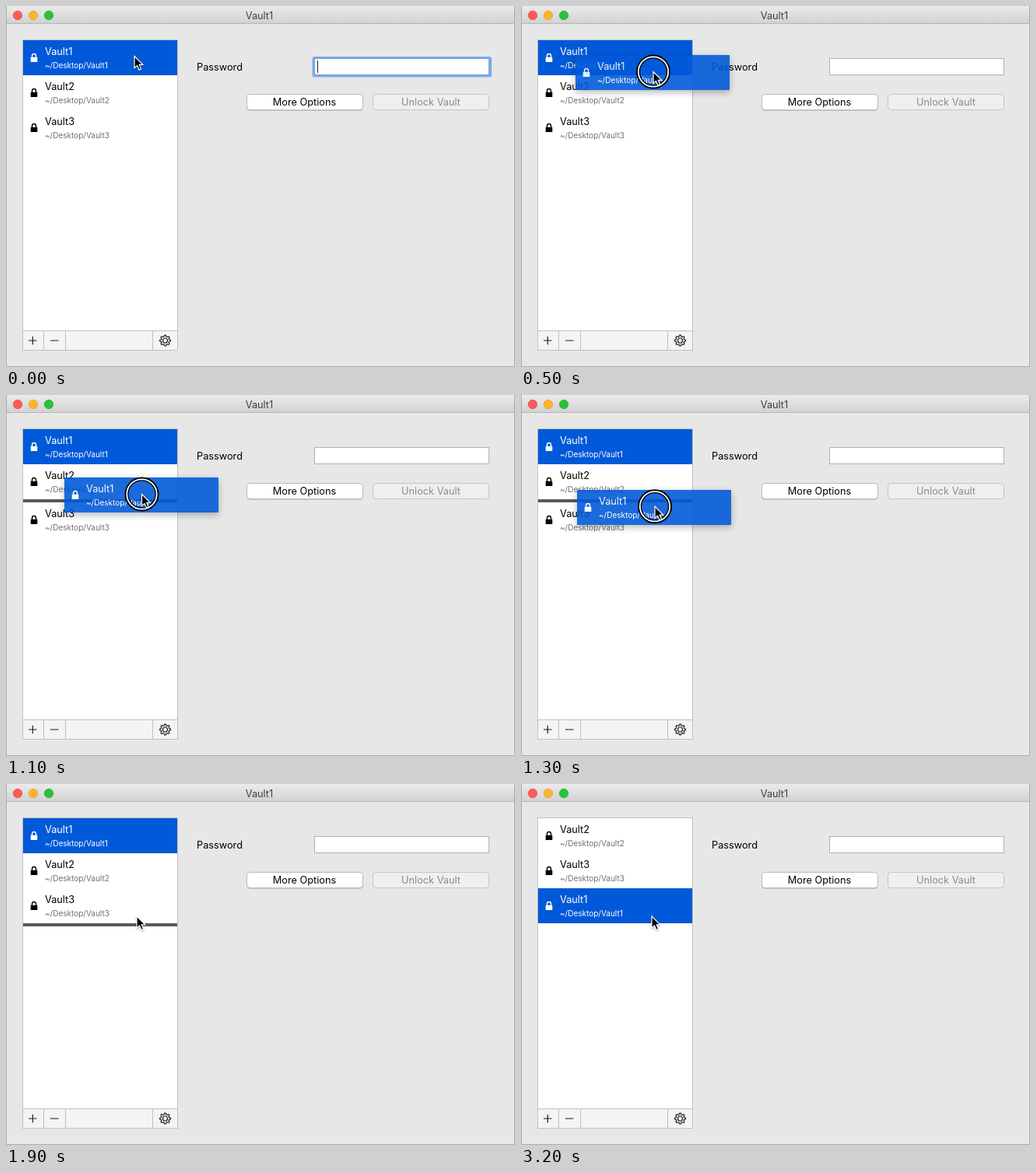
Recreate the animation shown at these times as an HTML page. Size 654 by 464 pixels, loop 3300 ms.

```html
<!DOCTYPE html>
<html lang="en">
<head>
<meta charset="utf-8">
<title>Reordering vaults</title>
<style>
  html, body { margin: 0; width: 100%; height: 100%; overflow: hidden; background: #e7e7e7; }
  svg { display: block; width: 654px; height: 464px; }
  text { font: 12.75px Inter, sans-serif; white-space: pre; }
  .middle { text-anchor: middle; }
  .path { font-size: 10px; fill: #707070; }
  .row .back { fill: none; }
  .selected { fill: #fff; }
  .selected .back { fill: #0059d8; }
  .selected .path { fill: #fff; }
  .line { fill: none; stroke: #c0c0c0; }
  .icon { fill: none; stroke: #1c1c1c; stroke-width: 1.2; }
  #ghost { opacity: .89; filter: drop-shadow(0 3px 5px rgba(0, 0, 0, .32)); }
</style>
</head>
<body>
<svg viewBox="0 0 654 464">
  <defs>
    <linearGradient id="titlebar" x2="0" y2="1">
      <stop stop-color="#ebebeb"/><stop offset="1" stop-color="#d2d2d2"/>
    </linearGradient>
  </defs>

  <!-- Window -->
  <rect width="654" height="464" fill="#e7e7e7"/>
  <rect width="654" height="22" fill="url(#titlebar)"/>
  <path d="M0 22.5H654" stroke="#b6b6b6"/>
  <path d="M.5 0V463.5H653.5V0" fill="none" stroke="#aaa"/>
  <circle cx="15" cy="12" r="5.7" fill="#fc5b57" stroke="#e2463f" stroke-width=".7"/>
  <circle cx="35" cy="12" r="5.7" fill="#fdb42c" stroke="#df9d23" stroke-width=".7"/>
  <circle cx="55" cy="12" r="5.7" fill="#28c23c" stroke="#1fa82e" stroke-width=".7"/>
  <text class="middle" x="325.5" y="17" fill="#404040">Vault1</text>

  <!-- List and its toolbar -->
  <rect class="line" x="21.5" y="43.5" width="199" height="399" style="fill:#fff"/>
  <rect x="22" y="418" width="198" height="24" fill="#f4f4f4"/>
  <path class="line" d="M22 417.5H220M48.5 418V442M76.5 418V442M188.5 418V442"/>
  <path class="icon" d="M29 430H39.5M34.3 424.8V435.2M57 430H67.5"/>
  <path class="icon" id="gear"/>
  <circle class="icon" cx="204.5" cy="430" r="3"/>
  <g id="list"></g>
  <rect id="bar" x="22" width="198" height="4" fill="#5a5a5a"/>

  <!-- Form -->
  <text x="245" y="83">Password</text>
  <rect x="396.5" y="67.5" width="224" height="21" fill="#fff" stroke="#b0b0b0"/>
  <g id="focus">
    <rect x="395" y="66.5" width="227.5" height="23.5" rx="1.5" fill="none" stroke="#7caeeb" stroke-width="3.2"/>
    <rect x="396.5" y="67.5" width="224" height="21" fill="none" stroke="#6b9bd6"/>
    <path d="M400.5 70V86" stroke="#222"/>
  </g>
  <rect x="309.5" y="114" width="149" height="20.5" rx="4" fill="#a9a9a9"/>
  <rect x="309.5" y="113.5" width="149" height="20" rx="4" fill="#fff" stroke="#b9b9b9"/>
  <text class="middle" x="383.5" y="128">More Options</text>
  <rect x="471.5" y="113.5" width="149" height="20" rx="4" fill="#efefef" stroke="#c4c4c4"/>
  <text class="middle" x="546" y="128" fill="#8c8c8c">Unlock Vault</text>

  <g id="ghost"></g>
  <g id="pointer">
    <g id="ring" fill="none">
      <circle r="19.5" stroke="#000" stroke-width="5"/>
      <circle r="19.2" stroke="#fff" stroke-width="1.8"/>
    </g>
    <path d="M0 0V15.2L3.5 11.9L6 17.6L8.6 16.5L6.2 10.9H10.8Z" stroke="#fff" stroke-width="1.2"
          style="filter:drop-shadow(0 1px 1px rgba(0,0,0,.35))"/>
  </g>
</svg>

<script>
const LOOP = 3300, STEP = 100, LIST_TOP = 44, ROW_HEIGHT = 45, BAR_HEIGHT = 4;
const FOCUS_LOST = 100, DRAG_START = 300, DROP = 1900, REORDER = 2000;

// Pointer tip as [time, x, y]
const PATH = [
  [0, 165, 64.5], [100, 165, 66], [200, 166, 69], [500, 170, 84.5], [600, 171.3, 89.5],
  [900, 175.5, 112.5], [1100, 174.5, 127.5], [1500, 169.5, 159], [1600, 168.5, 164],
  [1700, 168, 167.5], [1800, 168, 169.5], [1900, 168, 170]
];
// Insertion slot as [time, slot]; -1 hides the bar
const SLOTS = [[0, -1], [600, 1], [1000, 2], [1600, 3], [REORDER, -1]];

const el = id => document.getElementById(id);
const show = (id, visible) => el(id).style.display = visible ? "" : "none";
const move = (node, x, y) => node.setAttribute("transform", `translate(${x} ${y})`);

const rowMarkup = (name, selected) => `
  <g class="row ${selected ? "selected" : ""}">
    <rect class="back" width="198" height="${ROW_HEIGHT}"/>
    <path d="M9.7 21.8H18.3V28H9.7Z"/>
    <path d="M11.5 22V20.2a2.5 2.7 0 0 1 5 0V22" fill="none" stroke="${selected ? "#fff" : "#000"}" stroke-width="1.4"/>
    <text x="28" y="19">${name}</text>
    <text class="path" x="28" y="36">~/Desktop/${name}</text>
  </g>`;

const names = ["Vault1", "Vault2", "Vault3"];
el("list").innerHTML = names.map((name, i) => rowMarkup(name, i === 0)).join("");
el("ghost").innerHTML = rowMarkup(names[0], true);
const rows = [...el("list").children];

// Eight rounded teeth from a flattened sine
const gearPoints = Array.from({ length: 97 }, (_, i) => {
  const angle = i / 96 * 2 * Math.PI;
  const radius = 6.1 + .9 * Math.tanh(2.5 * Math.cos(8 * angle));
  return `${204.5 + radius * Math.cos(angle)} ${430 + radius * Math.sin(angle)}`;
});
el("gear").setAttribute("d", `M${gearPoints.join("L")}Z`);

function pointerAt(t) {
  const next = PATH.findIndex(key => key[0] > t);
  if (next < 0) return PATH[PATH.length - 1].slice(1);
  const [t0, x0, y0] = PATH[next - 1], [t1, x1, y1] = PATH[next];
  const k = (t - t0) / (t1 - t0);
  return [x0 + (x1 - x0) * k, y0 + (y1 - y0) * k];
}

function render(now) {
  const t = Math.floor(now % LOOP / STEP) * STEP;
  const [x, y] = pointerAt(t);
  const slot = SLOTS.filter(key => key[0] <= t).pop()[1];
  const order = t < REORDER ? [0, 1, 2] : [1, 2, 0];

  order.forEach((row, i) => {
    const shift = slot >= 0 && i >= slot ? BAR_HEIGHT : 0;
    move(rows[row], 22, LIST_TOP + i * ROW_HEIGHT + shift);
  });
  show("bar", slot >= 0);
  el("bar").setAttribute("y", LIST_TOP + slot * ROW_HEIGHT);
  show("focus", t < FOCUS_LOST);
  show("ring", t >= FOCUS_LOST && t < DROP);
  show("ghost", t >= DRAG_START && t < DROP);
  move(el("ghost"), Math.round(x - 100), Math.round(y - 21.5));
  move(el("pointer"), x, y);
}

(function frame() {
  render(performance.now());
  requestAnimationFrame(frame);
})();
</script>
</body>
</html>
```
